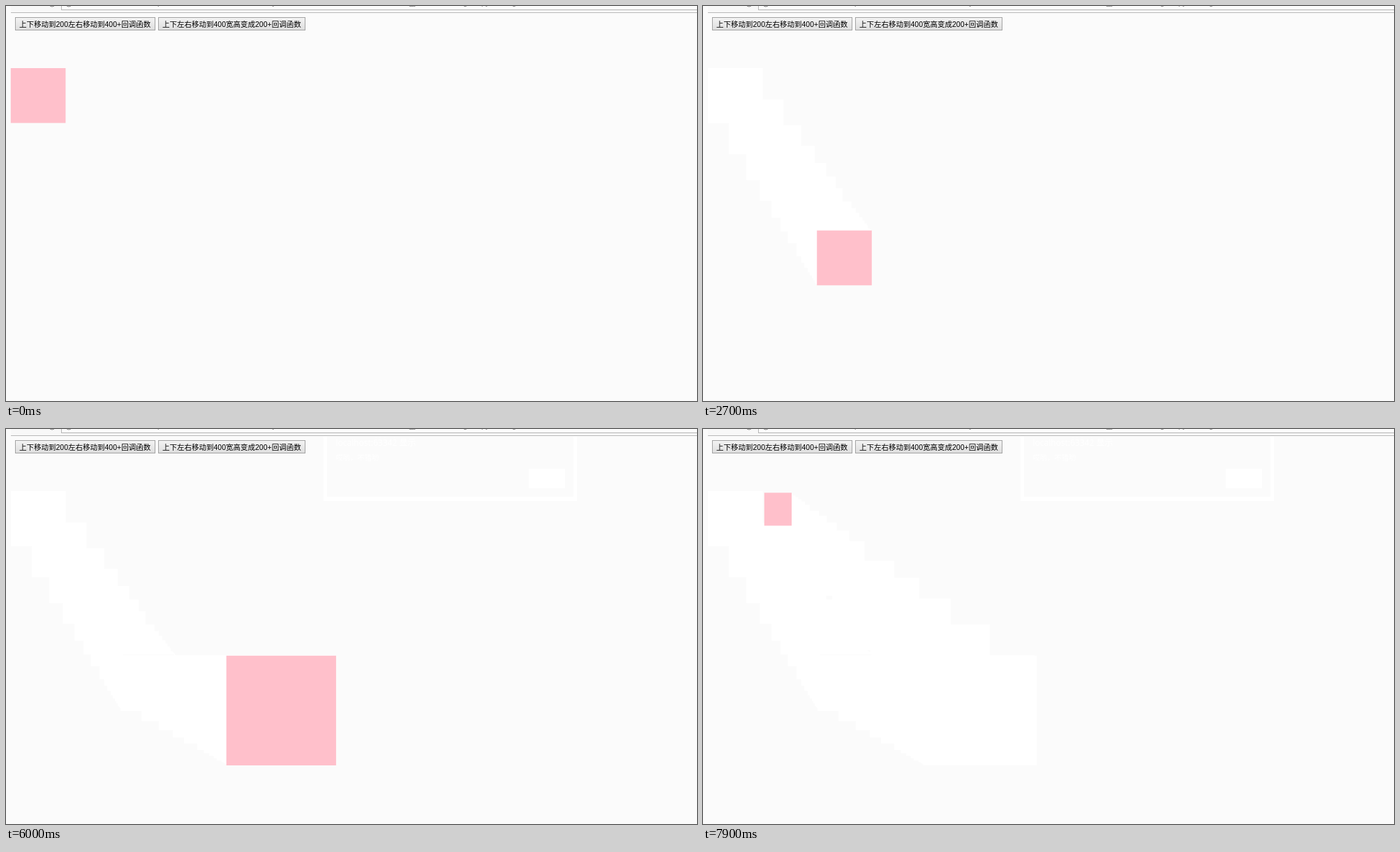
These frames come from a looping animation (990x566 px, 8 s). An HTML page with a canvas:

```html
<!DOCTYPE html>
<html lang="zh">
<head>
<meta charset="utf-8">
<style>
  html, body { margin: 0; width: 100%; height: 100%; overflow: hidden; background: #fbfbfb; }
  canvas { display: block; }
</style>
</head>
<body>
<canvas id="stage" width="990" height="566"></canvas>
<script>
const ctx = document.getElementById('stage').getContext('2d');
const LOOP = 8000, TICK = 100;
const PAGE = '#fbfbfb', PINK = '#ffc0cb';
const SCALE = 0.786, ORIGIN_X = 6.8, ORIGIN_Y = 10.4;
const UI_FONT = '"Liberation Sans", "Noto Sans CJK SC", "Noto Sans CJK", sans-serif';
const DIALOG_FONT = '"Open Sans", "Noto Sans CJK SC", "Noto Sans CJK", sans-serif';

// Poses are [left, top, width, height] in page pixels.
const START = [0, 100, 100, 100];
const PHASES = [
  { from: 11, to: [200, 400, 100, 100],
    // the alert blocks the last step until it is closed
    steps: tick => tick < 28 ? 2.15 * (tick - 11) : tick < 41 ? 37 : 38 },
  { from: 47, to: [400, 400, 200, 200], steps: tick => 2.21 * (tick - 47) },
  { from: 63, to: [100, 100, 50, 60], steps: tick => 2.21 * (tick - 63) }
];

// Each step covers a tenth of the remaining distance, rounded away from zero.
function ease(value, target, steps) {
  for (let i = 1; i <= steps && value !== target; i++) {
    const step = (target - value) / 10;
    value += step > 0 ? Math.ceil(step) : Math.floor(step);
  }
  return value;
}

function boxAt(tick) {
  let pose = START;
  for (const { from, to, steps } of PHASES) {
    if (tick < from) break;
    pose = pose.map((value, i) => ease(value, to[i], steps(tick)));
  }
  const [left, top, width, height] = pose.map(value => value * SCALE);
  return [ORIGIN_X + left, ORIGIN_Y + top, width, height];
}

function rect(color, x, y, w, h) {
  ctx.fillStyle = color;
  ctx.fillRect(x, y, w, h);
}

function roundedRect(color, x, y, w, h, radius) {
  ctx.fillStyle = color;
  ctx.beginPath();
  ctx.roundRect(x, y, w, h, radius);
  ctx.fill();
}

function outline(color, x, y, w, h) {
  ctx.strokeStyle = color;
  ctx.lineWidth = 1;
  ctx.strokeRect(x + 0.5, y + 0.5, w - 1, h - 1);
}

function text(string, x, y, font, color) {
  ctx.font = font;
  ctx.fillStyle = color;
  ctx.fillText(string, x, y);
}

function drawToolbar() {
  rect('#f8f8f8', 7, 0, 983, 9);
  rect('#fdfdfd', 80, 0, 910, 6);
  rect('#b4b4b4', 79, 0, 1, 6);
  rect('#b4b4b4', 80, 5, 910, 1);
  rect('#b9b9b9', 7, 9, 983, 1);
  // only the lowest pixels of the address line are visible
  const pieces = [['/', 182], ['p', 217], ['/', 289], ['/', 330], ['/', 372],
    ['j', 382], ['/', 407], ['_y', 578], ['g', 655], ['py', 681], ['g', 725]];
  for (const [piece, x] of pieces) text(piece, x, -1, `11px ${UI_FONT}`, '#777');
  ctx.strokeStyle = '#888';
  ctx.beginPath();
  ctx.arc(90, -3, 4, 0, Math.PI);
  ctx.moveTo(70, -3);
  ctx.arc(66, -3, 4, 0, Math.PI);
  ctx.stroke();
}

function drawButton(label, x, width, state) {
  const fill = ctx.createLinearGradient(0, 16, 0, 35);
  const [top, bottom] = { idle: ['#f4f4f4', '#dddddd'], hover: ['#f8f8f8', '#e2e2e2'],
    pressed: ['#dcdcdc', '#ededed'] }[state];
  fill.addColorStop(0, top);
  fill.addColorStop(1, bottom);
  rect(fill, x, 16, width, 19);
  outline(state === 'idle' ? '#a3a3a3' : '#7b7b7b', x, 16, width, 19);
  text(label, x + 6, 30, `10.5px ${UI_FONT}`, '#000');
}

function buttonState(tick, enter, press, leave) {
  if (tick < enter || tick >= leave) return 'idle';
  return tick === press ? 'pressed' : 'hover';
}

function dialogText(titleColor, messageColor) {
  text('localhost:63342 显示', 472.5, 33.5, `12px ${DIALOG_FONT}`, titleColor);
  text('哎哟，不错哟', 472.5, 55, `10.3px ${DIALOG_FONT}`, messageColor);
}

function drawDialog(tick) {
  const opening = tick === 30, closing = tick === 40;
  ctx.save();
  ctx.globalAlpha = opening ? 0.6 : closing ? 0.3 : 1;
  if (closing) ctx.translate(0, -10);
  ctx.save();
  ctx.shadowColor = 'rgba(0,0,0,.6)';
  ctx.shadowBlur = 4;
  ctx.shadowOffsetY = 1;
  roundedRect(PAGE, 460, 8, 352.5, 98, 1);
  ctx.restore();
  dialogText('#222', '#6a6a6a');
  roundedRect('#b4cffa', 748.5, 70.5, 52, 24, 2);
  roundedRect(tick === 39 ? '#3b78e7' : '#4a8bf5', 749.3, 71.3, 50.4, 22.4, 1.5);
  text('确定', 765, 86.5, `500 9.6px ${DIALOG_FONT}`, '#fff');
  ctx.restore();
}

// Pale remains of the closed dialog.
function drawDialogGhost() {
  const white = '#fff';
  rect(white, 455, 11, 5, 92);
  rect(white, 813, 11, 5, 92);
  rect(white, 460, 97, 353, 6);
  rect(white, 749, 57, 52, 28);
  ctx.save();
  ctx.translate(0, -10);
  dialogText(white, white);
  ctx.restore();
}

function draw(tick) {
  rect(PAGE, 0, 0, 990, 566);
  drawToolbar();
  if (tick >= 41) drawDialogGhost();
  for (let past = 0; past < tick; past++) rect('#fff', ...boxAt(past));
  if (tick >= 41) rect(PAGE, 168, 323, 73, 1);
  drawButton('上下移动到200左右移动到400+回调函数', 13, 201, buttonState(tick, 9, 10, 17));
  drawButton('上下左右移动到400宽高变成200+回调函数', 218, 211, buttonState(tick, 45, 46, 56));
  rect(PINK, ...boxAt(tick));
  if (tick >= 30 && tick <= 40) drawDialog(tick);
}

const begin = performance.now();
function animate() {
  draw(Math.floor((performance.now() - begin) % LOOP / TICK));
  requestAnimationFrame(animate);
}
animate();
</script>
</body>
</html>
```
